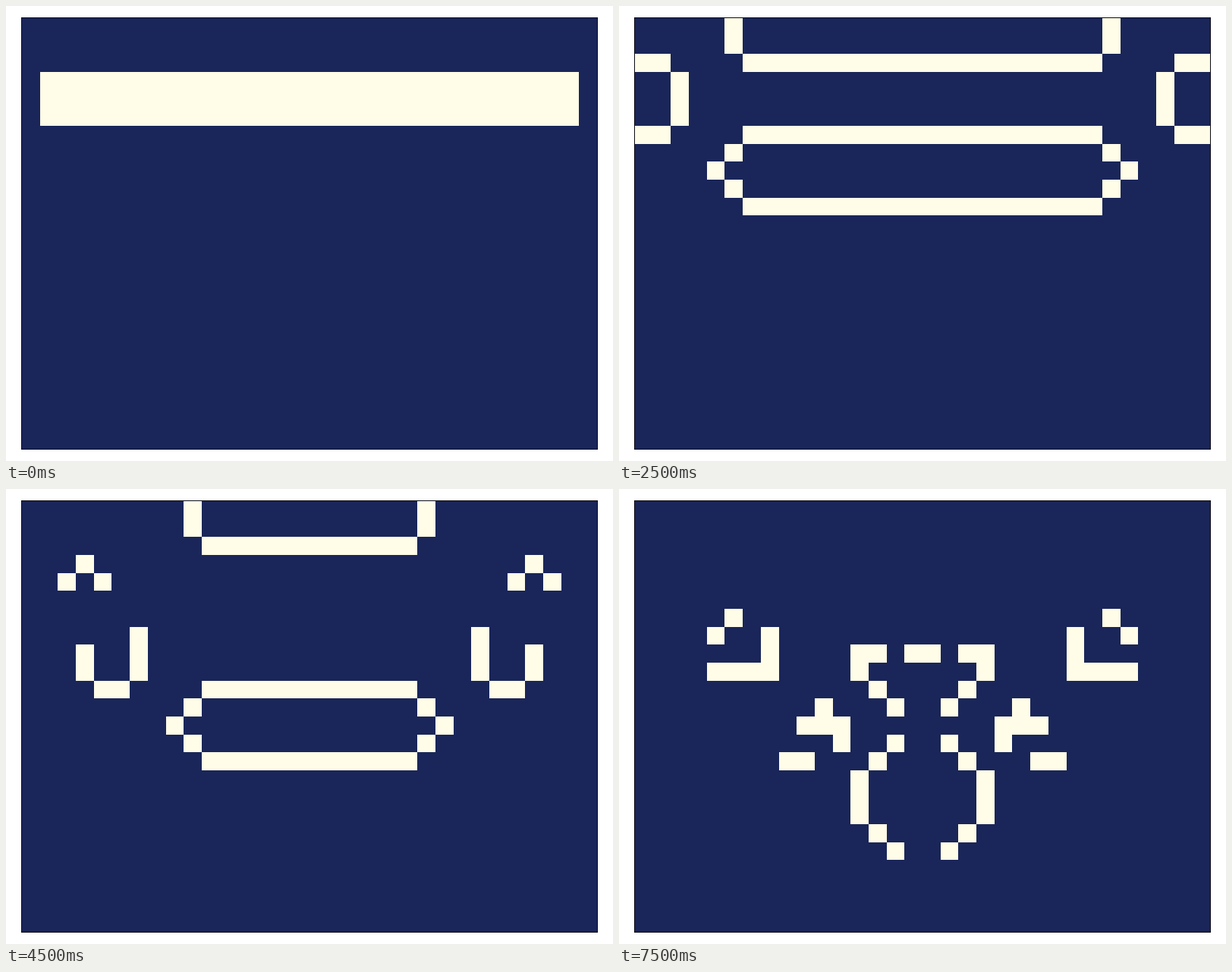
An HTML page with a canvas for the animation above (8 s loop, 800 by 600 pixels).

```html
<!DOCTYPE html>
<html lang="en">
<head>
<meta charset="utf-8">
<title>Game of Life</title>
<style>
  html, body { margin: 0; width: 100%; height: 100%; overflow: hidden; background: #fff; }
  canvas { display: block; }
</style>
</head>
<body>
<canvas id="stage" width="800" height="600"></canvas>
<script>
const COLS = 32, ROWS = 24;
const LEFT = 21, TOP = 16, WIDTH = 758, HEIGHT = 568;
const STEP = 500, GENERATIONS = 16;
const NAVY = '#1a2659', CREAM = '#fffde7';

const ctx = document.getElementById('stage').getContext('2d');
const edgeX = c => Math.round(LEFT + c * WIDTH / COLS);
const edgeY = r => Math.round(TOP + r * HEIGHT / ROWS);

const makeGrid = rule =>
  Array.from({ length: ROWS }, (_, r) => Array.from({ length: COLS }, (_, c) => rule(r, c)));

// Cells beyond the border count as dead.
function neighbours(grid, r, c) {
  let n = 0;
  for (let y = r - 1; y <= r + 1; y++)
    for (let x = c - 1; x <= c + 1; x++)
      if ((y !== r || x !== c) && grid[y]?.[x]) n++;
  return n;
}

const evolve = grid => makeGrid((r, c) => {
  const n = neighbours(grid, r, c);
  return n === 3 || (n === 2 && grid[r][c]);
});

const history = [makeGrid((r, c) => r >= 3 && r <= 5 && c >= 1 && c <= 30)];
while (history.length < GENERATIONS) history.push(evolve(history[history.length - 1]));

function draw(grid) {
  ctx.fillStyle = '#fff';
  ctx.fillRect(0, 0, 800, 600);
  ctx.fillStyle = NAVY;
  ctx.fillRect(LEFT, TOP, WIDTH, HEIGHT);
  ctx.fillStyle = CREAM;
  grid.forEach((row, r) => row.forEach((alive, c) => {
    if (!alive) return;
    const x = edgeX(c), y = edgeY(r);
    ctx.fillRect(x, y, edgeX(c + 1) - x, edgeY(r + 1) - y);
  }));
  ctx.strokeStyle = '#0a0a14';
  ctx.lineWidth = 1;
  ctx.strokeRect(LEFT - 0.5, TOP - 0.5, WIDTH + 1, HEIGHT + 1);
}

const start = performance.now();
function tick() {
  const elapsed = performance.now() - start;
  draw(history[Math.floor(elapsed / STEP) % GENERATIONS]);
  requestAnimationFrame(tick);
}
tick();
</script>
</body>
</html>
```
